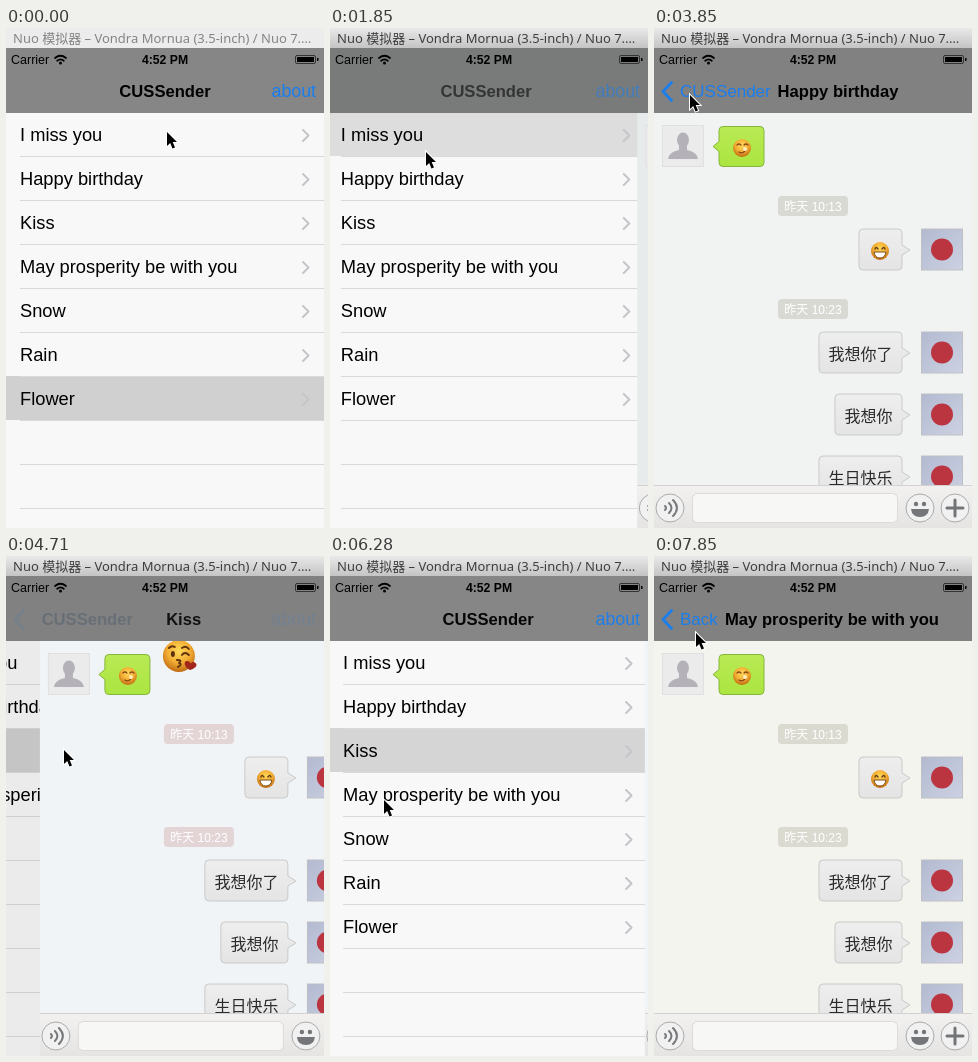
An HTML page that plays this animation: 318x500 px, repeating every 7990 ms.

```html
<!DOCTYPE html>
<html lang="en">
<head>
<meta charset="utf-8">
<title>Message list</title>
<style>
  html, body { margin: 0; width: 100%; height: 100%; overflow: hidden; background: #f8f8f8; }
  svg { display: block; font-family: "Liberation Sans", sans-serif; }
  .window { font: 13px "Noto Sans", "Noto Sans CJK SC", sans-serif; }
  .row { font-size: 18.3px; }
  .title { font-size: 16.6px; font-weight: bold; text-anchor: middle; }
  .link { font-size: 17px; fill: #1a7eee; }
  .stamp { font: 12px "Liberation Sans", "Noto Sans CJK SC", sans-serif; fill: #fff; text-anchor: middle; }
  .message { font: 16px "Noto Sans CJK SC", sans-serif; fill: #2a2a2a; text-anchor: middle; }
  .line { fill: none; stroke-linecap: round; stroke-linejoin: round; }
</style>
</head>
<body>
<svg id="stage" width="318" height="500" viewBox="0 0 318 500">
  <defs>
    <linearGradient id="chrome" x2="0" y2="1"><stop stop-color="#e9e9e9"/><stop offset="1" stop-color="#c4c4c4"/></linearGradient>
    <linearGradient id="green" x2="0" y2="1"><stop stop-color="#b9ea55"/><stop offset="1" stop-color="#abe540"/></linearGradient>
    <linearGradient id="grey" x2="0" y2="1"><stop stop-color="#eeeeee"/><stop offset="1" stop-color="#e4e4e5"/></linearGradient>
    <linearGradient id="tile" x2="1" y2="1"><stop stop-color="#b3b9d0"/><stop offset="1" stop-color="#ccd2e2"/></linearGradient>
    <linearGradient id="bar" x2="0" y2="1"><stop stop-color="#f2f1f0"/><stop offset="1" stop-color="#e6e4e2"/></linearGradient>
    <radialGradient id="skin" cy=".35" r=".65"><stop stop-color="#ffd95a"/><stop offset=".55" stop-color="#f3ae34"/><stop offset="1" stop-color="#c06a12"/></radialGradient>
    <g id="kiss">
      <circle r="16" fill="url(#skin)"/>
      <g class="line" stroke="#5e320c" stroke-width="1.8">
        <path d="M-10-8q3-3 6-1M3-8q4-3 7 1M3-1q3-4 7 0M-2 4q6 0 2 3q4 1-1 4"/>
      </g>
      <ellipse cx="-6" cy="-2" rx="2" ry="3" fill="#5e320c"/>
      <path d="M11 14C4 10 5 4 8.500 5q2.500 0 3.500 2.500q2-2.500 4.500-.5c3 2-.5 6-5.500 7z" fill="#a3261c"/>
    </g>
  </defs>
  <g id="list"></g>
  <rect id="dim" y="85" width="318" height="415"/>
  <g id="chat"></g>
  <rect id="nav" y="20" width="318" height="65"/>
  <g id="status">
    <text x="5" y="36" font-size="12.5">Carrier</text>
    <g class="line" stroke="#000" stroke-width="1.8"><path d="M49 30q5.500-4.500 11 0M51.200 32.700q3.300-2.600 6.600 0"/></g>
    <circle cx="54.500" cy="35" r="1.500"/>
    <text x="159" y="36" font-size="12.2" font-weight="bold" text-anchor="middle">4:52 PM</text>
    <rect x="289.500" y="27.500" width="20" height="8" rx="1.500" fill="none" stroke="#333"/>
    <path d="M291 29h17v5h-17zM311 30h1.500v3h-1.500z"/>
  </g>
  <text id="listTitle" class="title" y="69">CUSSender</text>
  <text id="about" class="link" x="265.500" y="69" style="font-size:17.800px">about</text>
  <text id="chatTitle" class="title" y="69"></text>
  <path id="arrow" class="line" d="M17.500 54.500L9 63.500l8.500 9" stroke="#1a7eee" stroke-width="2.800"/>
  <text id="back" class="link" y="69"></text>
  <rect id="chrome-bar" width="318" height="20"/>
  <text id="windowTitle" class="window" x="7" y="15">Nuo 模拟器 – Vondra Mornua (3.5-inch) / Nuo 7.…</text>
  <path id="cursor" d="M0 0v14l3.200-3l2.300 5.500l2.500-1l-2.300-5.400h4.300z" stroke="#fff" stroke-width="2" paint-order="stroke"/>
</svg>
<script>
const LOOP = 7990, STEP = 142.75, LAST_STEP = 55;
const SLIDE = 3.5;                       // steps a page transition takes
const NAV_LIST = '#868686', NAV_CHAT = '#818181';
const rows = ['I miss you', 'Happy birthday', 'Kiss', 'May prosperity be with you', 'Snow', 'Rain', 'Flower'];

// push, pop and fade are moments counted in steps
const scenes = [
  { row: 0, push: 3, pop: 11, fade: 12.2, x: 165, bg: '#e8ebeb', stamp: '#d8d8d4', popTint: '#797b7a' },
  { row: 1, push: 17.21, pop: 28, fade: 29.5, x: 184, bg: '#f1f3f2', stamp: '#d9d9d4', pushTint: '#b1a374' },
  { row: 2, push: 31.5, pop: 41.6, fade: 43.7, x: 159, bg: '#f0f4f6', stamp: '#e3d4d6' },
  { row: 3, push: 46.5, pop: 99, fade: 99, x: 178, bg: '#f3f4ee', stamp: '#dbdad0', back: 'Back' },
];

const pointer = [
  [0, 161, 104], [2.3, 110, 107], [3.5, 105, 107], [7, 42, 70], [11, 40, 70], [13, 96, 124],
  [16, 84, 150], [17, 82, 151], [19, 72, 149], [24, 38, 70], [27, 36, 67], [28.3, 36, 67],
  [30.5, 58, 192], [33, 58, 194], [38, 42, 141], [40.5, 38, 70], [41.8, 38, 70],
  [44, 54, 244], [47, 56, 243], [52, 43, 80], [55, 42, 77],
];

const KISS_STEP = 38, KISS_SPEED = 80;
const kisses = [[299, 89], [55, 74], [13, 174], [124, 219], [281, 197], [297, 226], [24, 262], [319, 272],
  [31, 344], [178, 348], [297, 408], [72, 467], [139, 500]];
for (let k = 0; k < 5; k++) kisses.push([24 + (k * 137 + 90) % 280, 30 - k * 42]);

const $ = id => document.getElementById(id);
const clamp = v => Math.max(0, Math.min(1, v));
const ease = u => 1 - (1 - u) ** 4;
const set = (id, attrs) => { for (const key in attrs) $(id).setAttribute(key, attrs[key]); };
const moveTo = (id, x, y = 0) => set(id, { transform: `translate(${x} ${y})` });

const drawRow = (name, n) => {
  const top = 85 + n * 44;
  return `<rect class="glow" y="${top - 1}" width="318" height="44" fill="#d0d0d0"/>
    <text class="row" x="14" y="${top + 28}">${name}</text>
    <path class="line" d="M297 ${top + 17}l5.500 5.500l-5.500 5.500" stroke="#c5c5ca" stroke-width="2"/>`;
};

const avatar = y => `<rect x="267.500" y="${y}" width="41" height="41" fill="url(#tile)" stroke="#bfc0c6"/>
  <circle cx="288" cy="${y + 20.5}" r="11" fill="#bb3541"/>`;

const bubble = (left, y, text = '') => `<path d="M${left + 4} ${y}H244q4 0 4 4v12l8 5l-8 5v11q0 4-4 4H${left + 4}q-4 0-4-4V${y + 4}q0-4 4-4z"
  fill="url(#grey)" stroke="#c9c9c9"/><text class="message" x="${(left + 248) / 2}" y="${y + 28}">${text}</text>${avatar(y)}`;

const stamp = (y, text) => `<rect class="stampBox" x="124" y="${y}" width="70" height="20" rx="4"/>
  <text class="stamp" x="159" y="${y + 14.5}">${text}</text>`;

const roundButton = (x, icon) => `<g transform="translate(${x} 480)"><circle r="14" fill="#f1f1f1" stroke="#a9abad"/>${icon}</g>`;

const smallFace = (x, y, features) => `<g transform="translate(${x} ${y})"><circle r="9" fill="url(#skin)"/>${features}</g>`;

$('list').innerHTML = '<rect y="85" width="318" height="415" fill="#f8f8f8"/>' + rows.map(drawRow).join('') +
  Array.from({ length: 9 }, (_, n) => `<path d="M14 ${128.5 + n * 44}H318" stroke="#d9d9d9"/>`).join('');

$('chat').innerHTML = `<rect id="paper" y="85" width="318" height="415"/>
  <rect x="8.500" y="97.500" width="41" height="41" fill="#ebebeb" stroke="#e0e0e0"/>
  <ellipse cx="29" cy="112" rx="6" ry="7.500" fill="#b4b2b8"/>
  <path d="M14 131q1-7 11-9v-5h8v5q10 2 11 9z" fill="#b4b2b8"/>
  <path d="M69 98.500h37q4 0 4 4v32q0 4-4 4H69q-4 0-4-4v-11l-6-5l6-5v-11q0-4 4-4z" fill="url(#green)" stroke="#86b53c"/>
  ${smallFace(88, 120, '<path class="line" d="M-5-3q2-2 4 0M2-3q2-2 4 0M-3 4q3 2 6-1" stroke="#8a4a18" stroke-width="1.300"/><circle cx="3" cy="1" r="2" fill="#ffeebc"/>')}
  ${stamp(168, '昨天 10:13')}
  ${bubble(205, 201)}
  ${smallFace(226, 223, '<path class="line" d="M-5-2q1-3 3 0M2-2q2-3 3 0" stroke="#6b4312" stroke-width="1.500"/><path d="M-6 1H6q-1 6-6 6t-6-6z" fill="#fff" stroke="#7c4c18"/>')}
  ${stamp(271, '昨天 10:23')}
  ${bubble(165, 304, '我想你了')}${bubble(181, 366, '我想你')}${bubble(165, 428, '生日快乐')}
  <rect y="457" width="318" height="43" fill="url(#bar)"/><path d="M0 457.500H318" stroke="#d2d2d2"/>
  ${roundButton(16, '<path class="line" d="M-5-2q2 2 0 4M-1-5q5 5 0 10M3-8q8 8 0 16" stroke="#77797c" stroke-width="2"/>')}
  <rect x="38.500" y="465.500" width="205" height="29" rx="5" fill="#f7f7f5" stroke="#dadada"/>
  ${roundButton(266, '<g fill="#737578"><circle cx="-4" cy="-4" r="2.200"/><circle cx="4" cy="-4" r="2.200"/><path d="M-9 1H9q-1 8-9 8t-9-8z"/></g>')}
  ${roundButton(301, '<path class="line" d="M-8 0H8M0-8V8" stroke="#737578" stroke-width="3"/>')}
  <g id="kisses">${kisses.map(() => '<use href="#kiss"/>').join('')}</g>`;

const glows = [...document.querySelectorAll('.glow')];
const stamps = [...document.querySelectorAll('.stampBox')];
const kissNodes = [...$('kisses').children];

function pointerAt(step) {
  const next = Math.max(1, pointer.findIndex(p => p[0] >= step));
  const [t0, x0, y0] = pointer[next - 1], [t1, x1, y1] = pointer[next];
  const u = clamp((step - t0) / (t1 - t0)), s = u * u * (3 - 2 * u);
  return [x0 + (x1 - x0) * s, y0 + (y1 - y0) * s];
}

function drawGlows(step) {
  const glow = (from, fade) => step >= from ? 1 - clamp((step - fade) / 2.3) : 0;
  glows.forEach((node, row) => {
    const scene = scenes.find(s => s.row === row);
    const alpha = scene ? glow(scene.push - 0.8, scene.fade) : row === 6 ? glow(0, 0) : 0;
    node.setAttribute('opacity', alpha);
  });
}

function drawPages(step) {
  const scene = scenes.filter(s => s.push <= step).pop() || scenes[0];
  const popping = step >= scene.pop;
  const u = clamp((step - (popping ? scene.pop : scene.push)) / SLIDE);
  const p = popping ? 1 - ease(u) : ease(u);       // 0 shows the list, 1 the chat
  const leaving = 1 - clamp(u / 0.5), arriving = clamp((u - 0.4) / 0.3);
  const moving = u > 0 && u < 1;

  moveTo('list', -95 * p);
  set('dim', { opacity: 0.055 * p });
  moveTo('chat', 318 * (1 - p));
  set('paper', { fill: scene.bg });
  stamps.forEach(node => node.setAttribute('fill', scene.stamp));
  const tint = moving && (popping ? scene.popTint : scene.pushTint);
  set('nav', { fill: tint || (p > 0.5 ? NAV_CHAT : NAV_LIST) });

  const listAlpha = popping ? arriving : leaving;
  set('listTitle', { x: 159 - 87 * p, opacity: listAlpha });
  set('about', { opacity: listAlpha });
  $('chatTitle').textContent = rows[scene.row];
  set('chatTitle', { x: scene.x + 175 * (1 - p), opacity: popping ? leaving : 1 - leaving });
  $('back').textContent = scene.back || 'CUSSender';
  const backAlpha = popping ? leaving : arriving;
  set('back', { x: 26 + 87 * (1 - p), opacity: backAlpha });
  set('arrow', { opacity: backAlpha });

  set('kisses', { visibility: scene.row === 2 ? 'visible' : 'hidden' });
  kissNodes.forEach((node, n) => {
    const [x, y] = kisses[n];
    node.setAttribute('transform', `translate(${x} ${y + (step - KISS_STEP) * KISS_SPEED})`);
  });
}

function render(ms) {
  const step = Math.min(LAST_STEP, Math.floor((ms % LOOP + 8) / STEP));
  const active = step > 1;
  set('chrome-bar', { fill: active ? 'url(#chrome)' : '#ececec' });
  set('windowTitle', { fill: active ? '#3e3e3e' : '#848484' });
  drawGlows(step);
  drawPages(step);
  moveTo('cursor', ...pointerAt(step));
}

const start = performance.now();
function tick() {
  render(performance.now() - start);
  requestAnimationFrame(tick);
}
tick();
</script>
</body>
</html>
```
